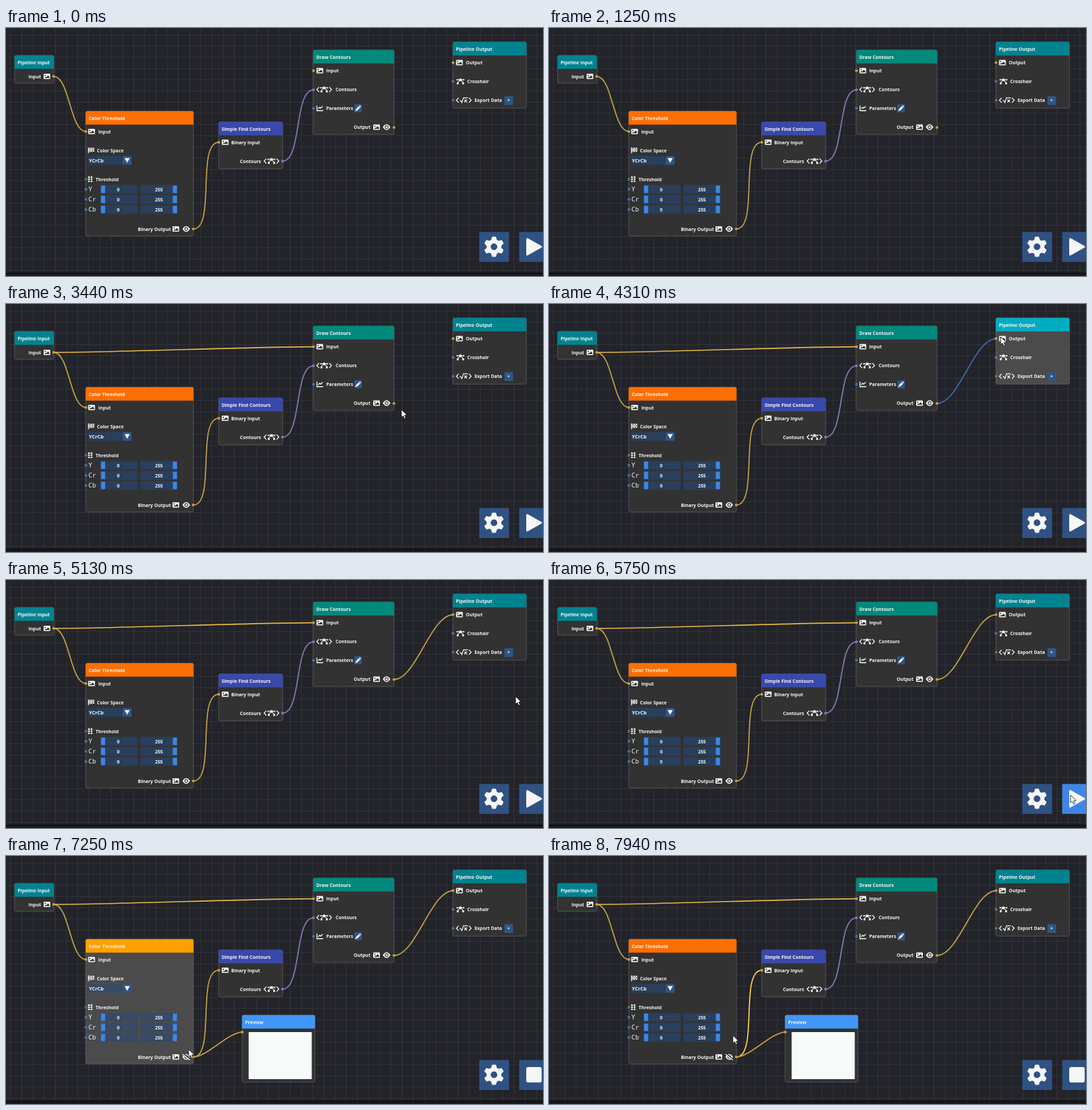
Animation, 800 px wide and 369 px high, one loop 8 s. Source, as an HTML page with a canvas:

```html
<!DOCTYPE html>
<html>
<head>
<meta charset="utf-8">
<style>
html, body { margin: 0; width: 100%; height: 100%; overflow: hidden; background: #23232a; }
canvas { display: block; }
</style>
</head>
<body>
<canvas id="stage" width="800" height="369"></canvas>
<script>
const ctx = document.getElementById('stage').getContext('2d');
const LOOP = 8000;
const FONT = '"Open Sans", "Noto Sans", sans-serif';
const WHITE = '#f6f6f6', YELLOW = '#bea044', BRIGHT = '#f8cf4c', DRAG = '#3d68b4', PURPLE = '#817ab0';
const BLUE = '#3f86e4', FIELD = '#293f5b', FIELD_HOT = '#384a64', BUTTON = '#2f5283', SMALL_BUTTON = '#2f5688';
const GRID = 16.667;

const nodes = {
  input:  { x: 13,  y: 41,  w: 58,  h: 41,  title: 'Pipeline Input', color: '#00838f', hot: '#00acc1' },
  thresh: { x: 119, y: 124, w: 160, h: 185, title: 'Color Threshold', color: '#ff6f00', hot: '#ffa000' },
  find:   { x: 317, y: 140, w: 95,  h: 69,  title: 'Simple Find Contours', color: '#3949ab', hot: '#5262c8' },
  draw:   { x: 458, y: 33,  w: 120, h: 125, title: 'Draw Contours', color: '#00897b', hot: '#00b09b' },
  output: { x: 666, y: 21,  w: 109, h: 98,  title: 'Pipeline Output', color: '#00838f', hot: '#00acc1' },
  preview:{ x: 352, y: 237, w: 108, h: 99,  title: 'Preview', color: '#4296fa', hot: '#4296fa' }
};

// time, x, y of the pointer tip
const path = [
  [1600, 420, 322], [2060, 74, 73], [2330, 74, 73], [2900, 460, 64], [3080, 461, 65],
  [3400, 589, 157], [3500, 589, 157], [3660, 578, 148], [3780, 578, 148], [4250, 673, 49], [4620, 673, 49],
  [5250, 768, 186], [5660, 777, 320], [6100, 777, 320], [6450, 271, 299],
  [6950, 271, 299], [7700, 274, 267], [8000, 274, 267]
];

function pointerAt(t) {
  if (t < path[0][0]) return null;
  const i = path.findIndex(p => p[0] > t);
  const [a, b] = [path[i - 1], path[i]];
  const u = (t - a[0]) / (b[0] - a[0]), s = u * u * (3 - 2 * u);
  return { x: a[1] + (b[1] - a[1]) * s, y: a[2] + (b[2] - a[2]) * s };
}

const inside = (p, b) => p && p.x >= b.x && p.x <= b.x + b.w && p.y >= b.y && p.y <= b.y + b.h;

function rect(x, y, w, h, fill, r = 0) {
  ctx.fillStyle = fill;
  ctx.beginPath();
  ctx.roundRect(x, y, w, h, r);
  ctx.fill();
}

function poly(points, fill) {
  ctx.fillStyle = fill;
  ctx.beginPath();
  points.forEach(p => ctx.lineTo(p[0], p[1]));
  ctx.closePath();
  ctx.fill();
}

function stroke(points, color = WHITE, width = 1.2) {
  ctx.strokeStyle = color;
  ctx.lineWidth = width;
  ctx.beginPath();
  points.forEach(p => ctx.lineTo(p[0], p[1]));
  ctx.stroke();
}

function dot(x, y, r, fill) {
  ctx.fillStyle = fill;
  ctx.beginPath();
  ctx.arc(x, y, r, 0, 7);
  ctx.fill();
}

function text(s, x, y, size = 6.9, weight = 700, family = FONT) {
  ctx.font = `${weight} ${size}px ${family}`;
  ctx.fillStyle = WHITE;
  ctx.textBaseline = 'alphabetic';
  ctx.fillText(s, x, y + 2.6);
}

function pin(x, y, color = YELLOW) { dot(x, y, 2.1, color); }

function link(x1, y1, x2, y2, color = YELLOW, width = 1.75) {
  const d = Math.hypot(x2 - x1, y2 - y1) / 4;
  ctx.strokeStyle = color;
  ctx.lineWidth = width;
  ctx.beginPath();
  ctx.moveTo(x1, y1);
  ctx.bezierCurveTo(x1 + d, y1, x2 - d, y2, x2, y2);
  ctx.stroke();
}

function picture(x, y) {
  rect(x - 5, y - 4, 10, 8, WHITE, 1.2);
  dot(x - 2.6, y - 1.6, 1, '#333');
  poly([[x - 3.8, y + 2.6], [x - 1.8, y + .4], [x - .8, y + 1.2], [x + 1.5, y - 1.6], [x + 3.8, y + 1], [x + 3.8, y + 2.6]], '#333');
}

function eye(x, y, slashed) {
  ctx.fillStyle = WHITE;
  ctx.beginPath();
  ctx.moveTo(x - 5.6, y);
  ctx.quadraticCurveTo(x, y - 8.4, x + 5.6, y);
  ctx.quadraticCurveTo(x, y + 8.4, x - 5.6, y);
  ctx.fill();
  dot(x, y, 2.7, '#333');
  dot(x, y, 1.6, WHITE);
  if (slashed) {
    stroke([[x - 5, y - 5], [x + 6, y + 3.6]], '#323232', 1.6);
    stroke([[x - 5.6, y - 4.2], [x + 5.4, y + 4.4]], WHITE, 1.3);
  }
}

function bezierIcon(x, y) {
  stroke([[x - 5, y - 2.6], [x + 5, y - 2.6]]);
  ctx.beginPath();
  ctx.arc(x, y + 3.2, 4.2, Math.PI, 0);
  ctx.stroke();
  rect(x - 1.7, y - 4.3, 3.4, 3.2, WHITE, .5);
  for (const s of [-1, 1]) {
    rect(x + s * 4 - 1.4, y + 1.4, 2.8, 2.8, WHITE, .5);
    dot(x + s * 5, y - 2.6, 1, WHITE);
  }
}

function brackets(x, y, d) {
  for (const s of [-1, 1])
    stroke([[x + s * (d - 3.4), y - 3.6], [x + s * d, y], [x + s * (d - 3.4), y + 3.6]], WHITE, 1.3);
}

function contourIcon(x, y) { brackets(x, y, 11); bezierIcon(x, y); }

function rootIcon(x, y) {
  brackets(x, y, 11);
  stroke([[x - 6, y + .6], [x - 4.5, y + .6], [x - 2.8, y + 3.6], [x - .6, y - 3.6], [x + 6, y - 3.6]]);
  stroke([[x + 1, y - 1], [x + 4.6, y + 3]]);
  stroke([[x + 4.6, y - 1], [x + 1, y + 3]]);
}

function chartIcon(x, y) {
  stroke([[x - 4.2, y - 4], [x - 4.2, y + 3.5], [x + 5, y + 3.5]], WHITE, 1.3);
  stroke([[x - 2.5, y + .8], [x - .2, y - 1.6], [x + 1.2, y - .2], [x + 4.2, y - 3]], WHITE, 1.3);
}

function flagIcon(x, y) {
  stroke([[x - 4.2, y - 4.5], [x - 4.2, y + 4.5]], WHITE, 1.2);
  poly([[x - 3.6, y - 3.6], [x + 4.4, y - 3.8], [x + 4.4, y + 2], [x - 3.6, y + 2.6]], WHITE);
  [[-2, -2.4], [1.6, -2.4], [-.2, -.7], [3, -.7], [-2, .9], [1.6, .9]].forEach(([a, b]) => rect(x + a - .7, y + b - .6, 1.5, 1.4, '#444'));
}

function gripIcon(x, y) {
  for (let i = 0; i < 6; i++) rect(x - 3.2 + (i % 2) * 3.8, y - 4.3 + (i >> 1) * 3.1, 2.6, 2.3, WHITE, .6);
}

function pencil(x, y) {
  rect(x - 5.5, y - 6, 11, 12, SMALL_BUTTON);
  stroke([[x - 2.2, y + 2.2], [x + 2, y - 2]], WHITE, 3);
  stroke([[x + 2.5, y - 2.5], [x + 3.6, y - 3.6]], WHITE, 3);
  poly([[x - 3.6, y + 1.4], [x - 4.2, y + 4.2], [x - 1.4, y + 3.6]], WHITE);
}

function gear(x, y, hole) {
  ctx.save();
  ctx.translate(x, y);
  for (let i = 0; i < 6; i++) {
    poly([[-4.6, -9], [-3, -14.6], [-2.4, -15], [2.4, -15], [3, -14.6], [4.6, -9]], WHITE);
    ctx.rotate(Math.PI / 3);
  }
  ctx.restore();
  dot(x, y, 11, WHITE);
  dot(x, y, 4.9, hole);
}

function background() {
  rect(0, 0, 800, 369, '#23232a');
  ctx.fillStyle = '#3d3d43';
  for (let x = 6.5; x < 800; x += GRID) ctx.fillRect(x, 0, .6, 364);
  for (let y = 10; y < 364; y += GRID) ctx.fillRect(0, y, 800, .6);
  rect(0, 364, 800, 1.5, '#0c0c0e');
  rect(0, 365.5, 800, 3.5, '#19191d');
}

function box(n, hot) {
  rect(n.x - .5, n.y - .5, n.w + 1, n.h + 1, hot ? '#4b4b4b' : '#323232', 2);
  ctx.strokeStyle = '#646464';
  ctx.lineWidth = .7;
  ctx.beginPath();
  ctx.roundRect(n.x - .2, n.y - .2, n.w + .4, n.h + .4, 2);
  ctx.stroke();
  rect(n.x - .3, n.y - .3, n.w + .6, 20, hot ? n.hot : n.color, [2, 2, 0, 0]);
  text(n.title, n.x + 4.2, n.y + 10);
}

function slider(y, label, hot) {
  pin(119, y, '#3a76b8');
  text(label, 122.8, y + .8, 9.4, 400, '"DejaVu Sans Mono", monospace');
  for (const [x, grab, value, tx] of [[140.5, 141.5, '0', 165.3], [200, 248.5, '255', 222]]) {
    rect(x, y - 6.5, 55.5, 13, hot ? FIELD_HOT : FIELD);
    rect(grab, y - 5.5, 6.2, 11, BLUE);
    text(value, tx, y);
  }
}

function pointer(p) {
  ctx.save();
  ctx.translate(p.x, p.y);
  const shape = [[0, 0], [0, 11.5], [2.7, 9.2], [4.6, 13.4], [6.6, 12.5], [4.8, 8.4], [8.3, 8.2]];
  poly(shape, '#fff');
  stroke([...shape, shape[0]], '#111', .8);
  ctx.restore();
}

function contents(t, hot, p) {
  text('Input', 33.5, 72);
  picture(61, 72);

  picture(127.5, 154);
  text('Input', 137.5, 154);
  flagIcon(127, 182);
  text('Color Space', 135.5, 182);
  rect(122.5, 190.5, 51.5, 13, hot.thresh ? FIELD_HOT : FIELD);
  rect(174, 190.5, 13, 13, SMALL_BUTTON);
  text('YCrCb', 123.5, 197, 7.4);
  poly([[176.5, 193.5], [184.5, 193.5], [180.5, 200.5]], WHITE);
  gripIcon(125.5, 225);
  text('Threshold', 133.5, 225);
  ['Y', 'Cr', 'Cb'].forEach((s, i) => slider(240 + i * 15, s, hot.thresh));
  text('Binary Output', 196.5, 299);
  picture(253, 299);
  if (inside(p, { x: 262, y: 293, w: 12, h: 12 })) rect(262.5, 293, 12, 12, BLUE);
  eye(268.5, 299, t >= 6750);

  picture(326.5, 170);
  text('Binary Input', 335.5, 170);
  text('Contours', 348.5, 198);
  contourIcon(395.5, 198);

  picture(467.5, 63.5);
  text('Input', 477, 63.5);
  contourIcon(474, 91.5);
  text('Contours', 491, 91.5);
  chartIcon(467.5, 119.5);
  text('Parameters', 477, 119.5);
  pencil(524.5, 119.5);
  text('Output', 518, 147.5);
  picture(552, 147.5);
  eye(567, 147.5);

  picture(675.5, 51.5);
  text('Output', 685, 51.5);
  bezierIcon(677, 79.5);
  text('Crosshair', 687, 79.5);
  rootIcon(682, 107.5);
  text('Export Data', 698, 107.5);
  rect(742.5, 101.5, 13, 13, SMALL_BUTTON);
  text('+', 746.8, 107.5);
}

function wires(t, p) {
  const overInput = t >= 1990 && t < 2400;
  link(71, 72, 119, 154, overInput ? BRIGHT : YELLOW);
  link(279, 299, 317, 170, t >= 7650 ? BRIGHT : YELLOW);
  link(412, 198, 458, 92, PURPLE);
  if (t >= 2960) link(71, 72, 458, 63.5, '#e2ba46');
  else if (t >= 2330) link(71, 72, p.x, p.y, DRAG);
  if (t >= 4500) link(578, 148, 666, 51.5);
  else if (t >= 4230) link(578, 148, 666, 51.5, DRAG);
  else if (t >= 3780) link(578, 148, p.x, p.y, DRAG);
  if (t >= 6750) link(279, 299, 352, 262);
}

function pins(t) {
  pin(71, 72, t >= 1990 && t < 2400 ? BRIGHT : YELLOW);
  [[119, 154], [279, 299], [317, 170], [458, 63.5], [578, 148], [666, 51.5]].forEach(a => pin(...a));
  [[412, 198], [458, 92]].forEach(a => pin(...a, PURPLE));
  pin(458, 119.5, '#3a76b8');
  pin(666, 79.5, '#955a80');
  pin(666, 107.5, '#477b68');
  pin(119, 225, '#477b68');
  if (t >= 6750) pin(352, 262);
}

function buttons(t, p) {
  const gearBox = { x: 705, y: 303.5, w: 44.5, h: 44.5 }, playBox = { ...gearBox, x: 764.5 };
  const fill = b => inside(p, b) ? BLUE : BUTTON;
  for (const b of [gearBox, playBox]) rect(b.x, b.y, b.w, b.h, fill(b));
  gear(727, 325.5, fill(gearBox));
  if (t >= 6000) rect(775, 314, 23, 23, WHITE, 3);
  else {
    const tri = [[776.5, 314], [797, 325.5], [776.5, 337]];
    poly(tri, WHITE);
    ctx.lineJoin = 'round';
    stroke([...tri, tri[0], tri[1]], WHITE, 3);
    ctx.lineJoin = 'miter';
  }
}

function render(t) {
  const p = pointerAt(t), hot = {};
  background();
  for (const id in nodes) {
    if (id === 'preview' && t < 6750) continue;
    hot[id] = inside(p, nodes[id]) && !(id === 'thresh' && t >= 7650);
    box(nodes[id], hot[id]);
  }
  contents(t, hot, p);
  if (t >= 6750) rect(361.5, 262, 94, 70, '#f6faf9');
  wires(t, p);
  pins(t);
  buttons(t, p);
  if (p) pointer(p);
}

const start = performance.now();
function frame() {
  render((performance.now() - start) % LOOP);
  requestAnimationFrame(frame);
}
frame();
</script>
</body>
</html>
```
